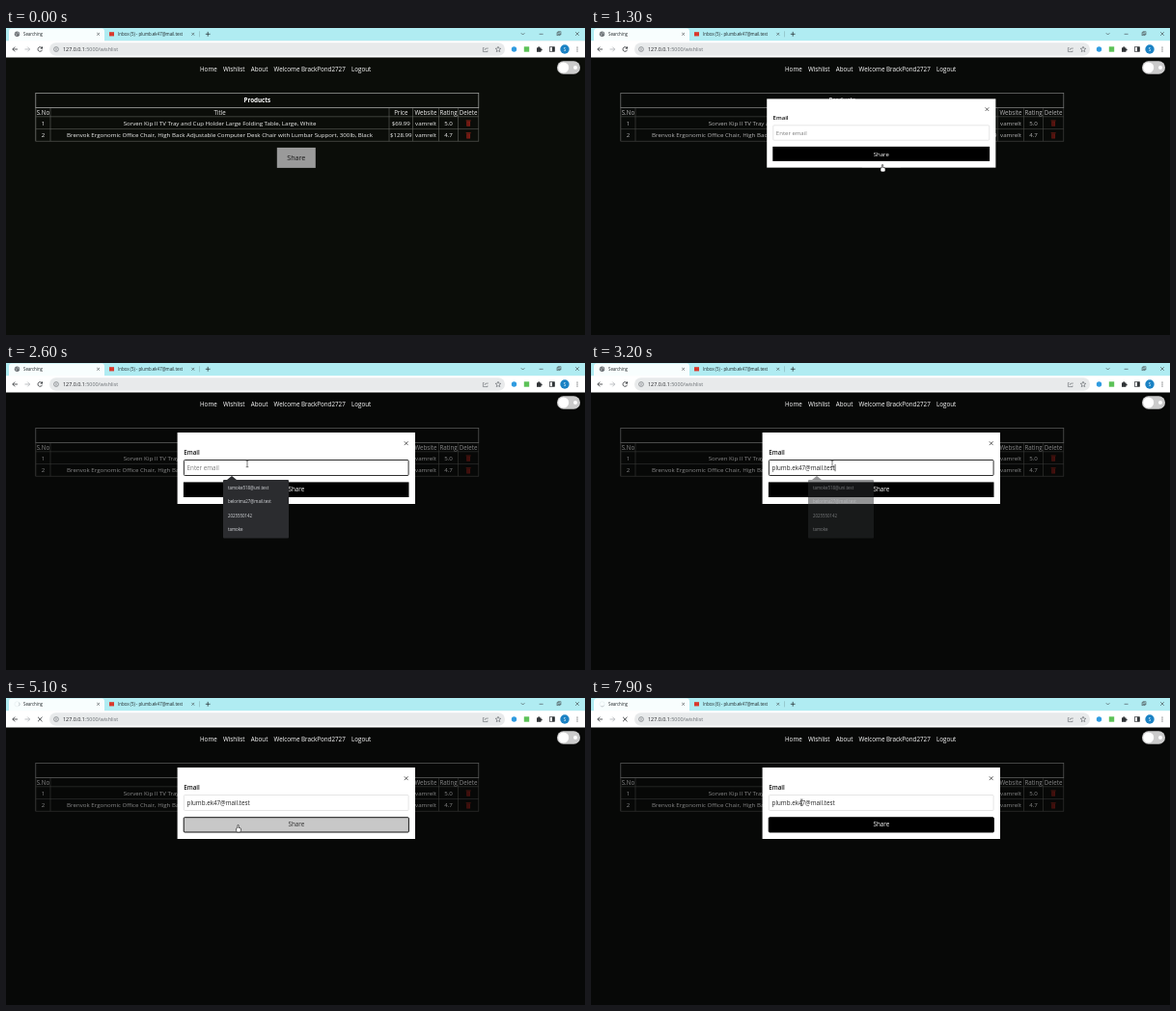
Recreate the animation shown at these times as an HTML page with a canvas. Size 600 by 318 pixels, loop 8 s.

```html
<!DOCTYPE html>
<html lang="en">
<head>
<meta charset="utf-8">
<title>Wishlist sharing</title>
<style>
html, body { margin: 0; width: 100%; height: 100%; overflow: hidden; background: #0b0d09; }
canvas { display: block; width: 600px; height: 318px; }
</style>
</head>
<body>
<canvas id="stage"></canvas>
<script>
const W = 600, H = 318, LOOP = 8000, STEP = 100;
const SANS = '"Open Sans", "Noto Sans", sans-serif';
const MAIL = 'plumb.ek47@mail.test';
const INK = '#3c4043', DIM = '#5f6368';
const REM = 6.25;

const canvas = document.getElementById('stage');
const dpr = window.devicePixelRatio || 1;
canvas.width = W * dpr;
canvas.height = H * dpr;
const c = canvas.getContext('2d');
c.scale(dpr, dpr);

const clamp = v => Math.max(0, Math.min(1, v));
const ramp = (t, a, b) => clamp((t - a) / (b - a));
const mix = (a, b, p) => a + (b - a) * p;
const smooth = p => p * p * (3 - 2 * p);
const grey = v => `rgb(${v},${v},${v})`;

// y is the middle of the capitals; returns the width
function text(s, x, y, size, color, align = 'left', weight = 400) {
  c.font = `${weight} ${size}px ${SANS}`;
  c.textAlign = align;
  c.fillStyle = color;
  c.fillText(s, x, y + size * 0.357);
  return c.measureText(s).width;
}

function rect(x, y, w, h, color) {
  c.fillStyle = color;
  c.fillRect(x, y, w, h);
}

function frame(x, y, w, h, color, width) {
  c.strokeStyle = color;
  c.lineWidth = width;
  c.strokeRect(x, y, w, h);
}

function round(x, y, w, h, r, fill, stroke, width = 0.5) {
  c.beginPath();
  c.roundRect(x, y, w, h, r);
  if (fill) { c.fillStyle = fill; c.fill(); }
  if (stroke) { c.strokeStyle = stroke; c.lineWidth = width; c.stroke(); }
}

function disc(x, y, r, color) {
  c.beginPath();
  c.arc(x, y, r, 0, 7);
  c.fillStyle = color;
  c.fill();
}

function ring(x, y, r, color, width, a = 0, b = Math.PI * 2) {
  c.beginPath();
  c.arc(x, y, r, a, b);
  c.strokeStyle = color;
  c.lineWidth = width;
  c.stroke();
}

function line(color, width, ...p) {
  c.beginPath();
  for (let i = 0; i < p.length; i += 2) c.lineTo(p[i], p[i + 1]);
  c.strokeStyle = color;
  c.lineWidth = width;
  c.stroke();
}

function cross(x, y, r, color, width) {
  line(color, width, x - r, y - r, x + r, y + r);
  line(color, width, x - r, y + r, x + r, y - r);
}

function arrow(x, y, dir, color) {
  const tip = x + dir * 2.6, back = tip - dir * 2.4;
  line(color, 0.8, x - dir * 2.6, y, tip, y);
  line(color, 0.8, back, y - 2.4, tip, y, back, y + 2.4);
}

function triangle(x1, y1, x2, y2, x3, y3, fill) {
  c.beginPath();
  c.moveTo(x1, y1);
  c.lineTo(x2, y2);
  c.lineTo(x3, y3);
  c.closePath();
  c.fillStyle = fill;
  c.fill();
}

function star(x, y, r) {
  c.beginPath();
  for (let i = 0; i < 10; i++) {
    const a = i * Math.PI / 5 - Math.PI / 2, d = i % 2 ? r * 0.45 : r;
    c.lineTo(x + d * Math.cos(a), y + d * Math.sin(a));
  }
  c.closePath();
  c.strokeStyle = DIM;
  c.lineWidth = 0.6;
  c.stroke();
}

function trash(x, y) {
  rect(x - 1.9, y - 1.7, 3.8, 5, '#8a2018');
  rect(x - 2.5, y - 2.8, 5, 0.8, '#a5281b');
  for (const d of [-0.7, 0.7]) line('#3c0d08', 0.4, x + d, y - 1, x + d, y + 2.6);
}

const COLUMNS = [
  ['S.No', 15.2], ['Title', 351], ['Price', 24.5], ['Website', 27], ['Rating', 20], ['Delete', 21.3]
];
const ROWS = [
  ['1', 'Sorven Kip II TV Tray and Cup Holder Large Folding Table, Large, White', '$69.99', 'vamrelt', '5.0'],
  ['2', 'Brenvok Ergonomic Office Chair, High Back Adjustable Computer Desk Chair with Lumbar Support, 300lb, Black', '$128.99', 'vamrelt', '4.7']
];

function drawTable() {
  const left = 30.8, width = 459, top = 67.4, head = 82.7, bottom = 117.2;
  const rowY = r => 98.4 + r * 12.8;
  const ink = '#f2f2f2', rule = '#62635f';
  let x = left;
  COLUMNS.forEach(([name, w], i) => {
    const mid = x + w / 2;
    line(rule, 0.6, x, head, x, bottom);
    text(name, mid, 87.3, 6.2, ink, 'center');
    ROWS.forEach((row, r) => {
      if (row[i]) text(row[i], mid, rowY(r), 6.15, ink, 'center');
      else trash(mid, rowY(r));
    });
    x += w;
  });
  for (let r = 0; r < 2; r++) line(rule, 0.6, left, rowY(r) - 6.6, left + width, rowY(r) - 6.6);
  frame(left, head, width, bottom - head, rule, 0.6);
  frame(left, top, width, head - top, '#a8a9a6', 0.7);
  text('Products', left + width / 2, 75, REM, '#fff', 'center', 700);
}

function drawPage(t) {
  rect(0, 30, W, H - 30, '#0b0d09');
  drawTable();
  const off = ramp(t, 1150, 1400);
  const tone = mix(mix(154, 200, ramp(t, 0, 200)), 14, off);
  rect(280.8, 123.9, 40, 21, grey(tone));
  text('Share', 300.8, 134.5, 7.2, grey(mix(24, 240, off)), 'center');
  rect(0, 30, W, H - 30, `rgba(3,3,5,${ramp(t, 1100, 1450) * 0.45})`);
}

function drawNav() {
  let x = 201;
  for (const s of ['Home', 'Wishlist', 'About', 'Welcome BrackPond2727', 'Logout'])
    x += text(s, x, 42.5, REM, '#fff') + REM;
  round(571, 34.3, 24, 13.5, 6.7, '#cbcbcb');
  disc(577.7, 41, 5.5, '#fff');
  disc(590, 41, 2, '#fff');
}

function drawPopup(t) {
  const fill = '#2b2c2f';
  c.globalAlpha = 1 - ramp(t, 3100, 3300);
  triangle(229, 121, 234, 117, 239, 121, fill);
  round(225, 121, 68, 60.5, 1, fill);
  ['tamoke518@uni.test', 'belorima27@mail.test', '2025550142', 'tamoke']
    .forEach((s, i) => text(s, 230, 129.6 + i * 14.3, 4.4, '#dcdee2'));
  c.globalAlpha = 1;
}

function drawModal(t) {
  const p = ramp(t, 1150, 1450);
  if (!p) return;
  const cx = 300.8, cy = 109, k = 1 - 0.3 * (1 - p) ** 3;
  c.save();
  c.globalAlpha = clamp(p * 2);
  c.translate(cx, cy);
  c.scale(k, k);
  c.translate(-cx, -cy);

  rect(177.6, 72, 246.4, 74, '#fff');
  cross(414.7, 83.2, 1.9, '#222', 0.7);
  text('Email', 184.2, 92.6, REM, '#111', 'left', 600);

  const focus = t >= 2100 && t < 4400;
  const filled = t >= 3000;
  round(184.4, 100.5, 232.7, 16, 1, '#fff', focus ? '#0a0a0a' : '#d4d4d4', focus ? 0.85 : 0.6);
  const w = text(filled ? MAIL : 'Enter email', 187.6, 108.5, REM, filled ? '#222' : '#7c7c7c');
  const caret = focus && t < 3500 && (t < 2600 || filled);
  if (caret) rect(187.6 + (filled ? w : 0), 104.8, 0.6, 7.4, '#000');

  const hover = ramp(t, 3650, 3900) - ramp(t, 7550, 7800);
  const fill = grey(mix(0, 200, hover));
  if (t >= 4400) round(184.2, 123.7, 233.2, 15.3, 1, fill, '#0a0a0a', 0.95);
  else rect(183.9, 123.4, 233.6, 15.6, fill);
  text('Share', cx, 131.2, REM, grey(mix(255, 45, hover)), 'center');
  c.restore();

  if (t >= 2100 && t < 3300) drawPopup(t);
}

function drawTabs(t, loading) {
  const y = 6.3, ink = '#1f2427';
  rect(0, 0, W, 13.5, '#b0ecf2');
  round(3, 0.5, 99, 16, 3, '#f8fefe');
  if (loading) {
    const a = -t / 1000 * Math.PI * 2;
    ring(11.5, y, 2.6, '#dfe6e8', 0.5);
    ring(11.5, y, 2.6, '#a9b1b5', 0.6, a, a + 1.4);
  } else {
    disc(11.5, y, 2.7, '#6b7074');
    line('#e8f0f0', 0.5, 9.5, 5.3, 11, y, 10.6, 8);
    line('#e8f0f0', 0.5, 12, 4, 12.4, 5.6, 13.8, y);
  }
  text('Searching', 18, y, 4.4, ink);
  rect(107, 4.2, 5, 4.2, '#d9382c');
  text(`Inbox (${t >= 7100 ? 6 : 5}) - ${MAIL}`, 116, y, 4.4, ink);
  for (const x of [95.6, 193.8]) cross(x, y, 1.4, INK, 0.6);
  line('#7fa9ad', 0.5, 200.5, y - 3, 200.5, y + 3);
  line(ink, 0.7, 206.8, y, 211.6, y);
  line(ink, 0.7, 209.2, y - 2.4, 209.2, y + 2.4);

  line(INK, 0.6, 533.8, 5.2, 535.6, 7, 537.4, 5.2);
  line(INK, 0.6, 552.6, y, 556.6, y);
  frame(572, 3.8, 3, 3, INK, 0.5);
  frame(571, 4.8, 3, 3, INK, 0.5);
  cross(592, 6, 1.8, INK, 0.6);
}

function drawToolbar(loading) {
  const y = 22, ink = '#303336';
  rect(0, 13.3, W, 17.2, '#fff');
  round(45, 15.3, 472, 13.4, 6.7, '#e8eaeb');
  arrow(9.4, y, -1, ink);
  arrow(22.1, y, 1, '#aeb2b5');
  if (loading) cross(35.3, y, 2.2, ink, 0.9);
  else {
    ring(35.3, y, 2.3, ink, 0.8, 0.3, 5.5);
    triangle(38, y - 3, 38, y - 0.4, 35.4, y - 0.4, ink);
  }

  ring(52, y, 2.4, DIM, 0.6);
  line(DIM, 0.6, 52, y - 1.3, 52, y + 1.4);
  const host = text('127.0.0.1', 59, y, 5.4, '#202124');
  text(':5000/wishlist', 59 + host, y, 5.4, '#6a6f73');

  line(DIM, 0.6, 495.5, 20.5, 494.4, 20.5, 494.4, 24.6, 499, 24.6, 499, 23.4);
  line(DIM, 0.6, 496, 23, 496.8, 21.3, 499.8, 21);
  star(510, y + 0.2, 3);

  disc(526.5, y, 2.7, '#2f9be0');
  rect(536.8, y - 2.7, 5.4, 5.4, '#5cc257');
  rect(550, y - 1.6, 4.4, 4.4, ink);
  disc(552.2, y - 1.8, 1, ink);
  disc(554.7, y + 0.6, 1, ink);
  frame(563.4, y - 2.3, 5, 4.6, ink, 0.7);
  rect(566, y - 2.3, 2.4, 4.6, ink);
  disc(579, y, 4.7, '#1a82c4');
  text('S', 579, y, 4.6, '#fff', 'center');
  for (const d of [-2, 0, 2]) disc(592, y + d, 0.6, ink);
}

// each move starts, ends, and leads to a resting point
const MOVES = [
  { from: 100, to: 400, x: 302, y: 141.5 },
  { from: 1400, to: 1700, x: 250, y: 104.5 },
  { from: 3500, to: 3900, x: 240.5, y: 131.5 },
  { from: 7500, to: 7900, x: 218.3, y: 108.3 }
];

function drawPointer(t) {
  if (t < MOVES[0].from) return;
  let x = 296, y = 157;
  for (const m of MOVES) {
    const p = smooth(ramp(t, m.from, m.to));
    x = mix(x, m.x, p);
    y = mix(y, m.y, p);
  }
  c.save();
  c.translate(x, y);
  if (y > 100 && y < 117) {
    line('#222', 0.6, 0, -3, 0, 3);
    for (const d of [-3.2, 3.2]) line('#222', 0.6, -1.3, d, 1.3, d);
  } else if (y > 123 && y < 145) {
    round(-0.6, 0, 1.3, 5, 0.6, '#fff', '#111', 0.6);
    round(-2, 3, 5, 4.4, 1.4, '#fff', '#111', 0.6);
    rect(-0.3, 2.4, 0.7, 2, '#fff');
  } else triangle(0, 0, 0, 6.6, 4.7, 4.7, '#fff');
  c.restore();
}

function draw(t) {
  const loading = t >= 4400;
  drawPage(t);
  drawNav();
  drawModal(t);
  drawTabs(t, loading);
  drawToolbar(loading);
  drawPointer(t);
}

// the screen updates ten times a second
const start = performance.now();
function tick() {
  const t = (performance.now() - start) % LOOP;
  draw(Math.floor(t / STEP) * STEP);
  requestAnimationFrame(tick);
}
tick();
</script>
</body>
</html>
```
